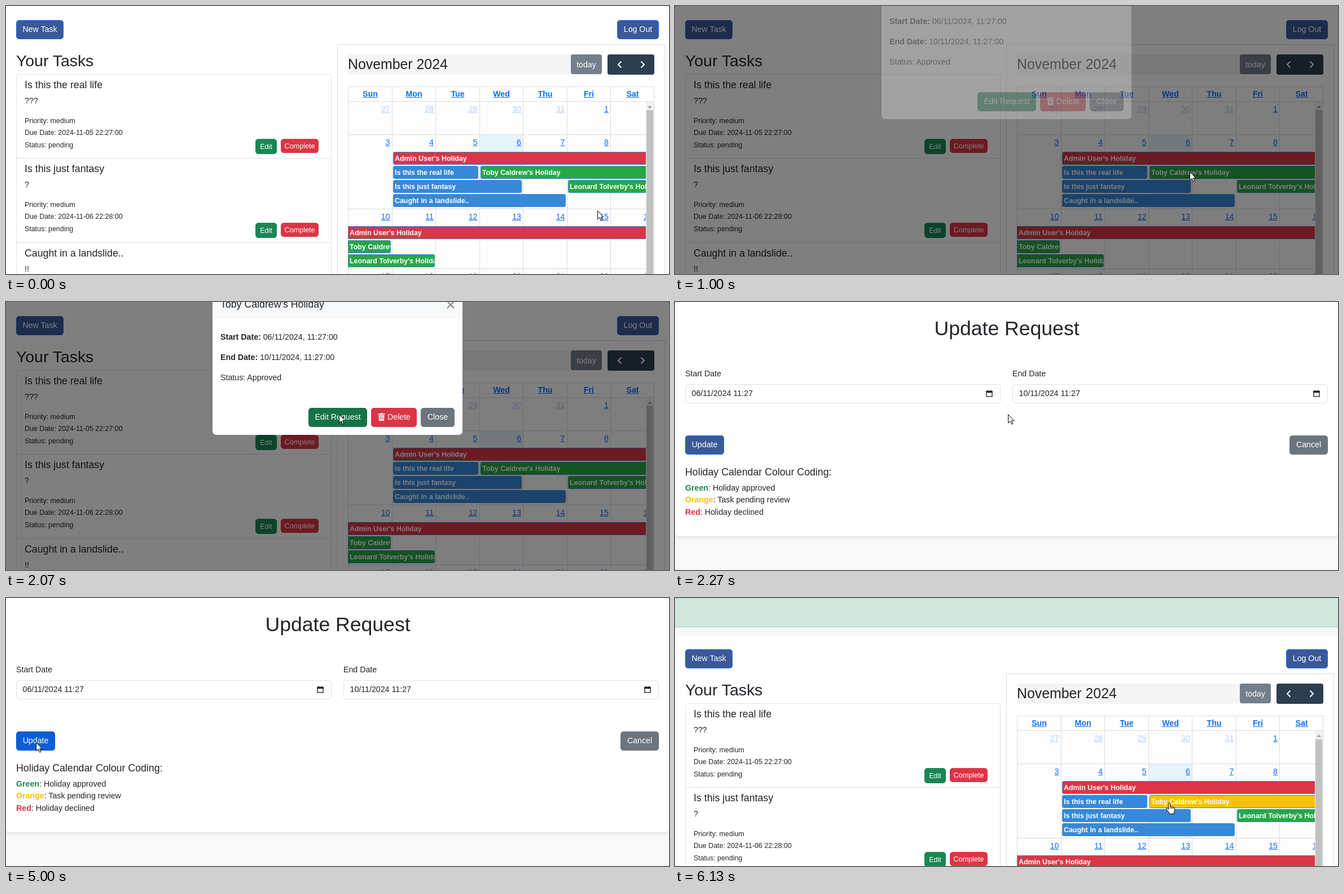
Recreate the animation shown at these times as an HTML page. Size 1175 by 476 pixels, loop 8870 ms.

```html
<!DOCTYPE html>
<html lang="en">
<head>
<meta charset="utf-8">
<title>Task planner</title>
<style>
  html, body { margin: 0; width: 100%; height: 100%; overflow: hidden; background: #f9f9f9; }
  #stage { position: relative; width: 1175px; height: 476px; overflow: hidden; background: #f9f9f9;
    font-family: "Liberation Sans", Arial, sans-serif; color: #212529; }
  #stage div, #stage svg { position: absolute; box-sizing: border-box; }
  #stage .text, #stage svg { pointer-events: none; }
  .text { white-space: pre; }
  .layer { left: 0; top: 0; width: 1175px; height: 476px; }
  .card { background: #fff; border-radius: 7px; box-shadow: 0 3px 7px rgba(0, 0, 0, .1); }
  .link { color: #0d6efd; text-decoration: underline; text-decoration-skip-ink: none; }
  .button { border: 1px solid; border-radius: 5px; }
  .event { border: 1px solid #3788d8; overflow: hidden; color: #fff; font-weight: bold; }
</style>
</head>
<body>
<div id="stage"></div>
<script>
const LOOP = 8870, STEP = 1000 / 15, W = 1175;
const BODY = 14.2, SMALL = 12.42, HEAD = 17.75;
const WHITE = 'color:#fff;', LINE = '#ddd';
const BLUE = '#3788d8', GREEN = '#28a745', RED = '#dc3545', YELLOW = '#ffc107';
const stage = document.getElementById('stage');

function box(parent, x, y, w, h, css = '', cls = '') {
  const el = document.createElement('div');
  el.className = cls;
  el.style.cssText = `left:${x}px;top:${y}px;width:${w}px;height:${h}px;${css}`;
  parent.append(el);
  return el;
}

function layer(parent) {
  return box(parent, 0, 0, W, 476);
}

// Places text by its baseline; x is the left, centre or right edge.
function text(parent, x, base, str, size = BODY, css = '', align = 'left', cls = '') {
  const up = Math.round(size * .905), line = up + Math.round(size * .212);
  const el = document.createElement('div');
  const place = {
    left: `left:${x}px;`,
    center: `left:${x - 200}px;width:400px;text-align:center;`,
    right: `right:${W - x}px;`
  }[align];
  el.className = 'text ' + cls;
  el.style.cssText = `${place}top:${base - up}px;font-size:${size}px;line-height:${line}px;${css}`;
  el.innerHTML = str;
  parent.append(el);
  return el;
}

function button(parent, x, y, w, h, label, color, base, size = BODY, border = color) {
  const el = box(parent, x, y, w, h, `background:${color};border-color:${border}`, 'button');
  text(parent, x + w / 2, base, label, size, WHITE, 'center');
  return el;
}

function svg(parent, x, y, w, h, body) {
  parent.insertAdjacentHTML('beforeend',
    `<svg style="left:${x}px;top:${y}px" width="${w}" height="${h}" viewBox="0 0 ${w} ${h}">${body}</svg>`);
  return parent.lastElementChild;
}

function primary(parent, x, y, w, label) {
  return button(parent, x, y, w, 34, label, '#3b5998', y + 21, BODY, '#0d6efd');
}

// Home page
const home = layer(stage);
box(home, 0, 0, W, 700, '', 'card');
primary(home, 18, 25, 84, 'New Task');
primary(home, 1083, 25, 74, 'Log Out');
text(home, 18, 107, 'Your Tasks', 28.4);
box(home, 18, 121, 559, 500, 'border:1px solid #dee2e6;border-radius:5px');

const tasks = [
  ['Is this the real life', '???', '05 22:27:00'],
  ['Is this just fantasy', '?', '06 22:28:00'],
  ['Caught in a landslide..', '!!', '07 22:28:00']
];
tasks.forEach(([title, note, due], i) => {
  const y = Math.round(i * 149.4);
  if (i) box(home, 18, 121 + y, 558, 1, 'background:#dee2e6');
  text(home, 33, 146 + y, title, HEAD);
  text(home, 33, 173 + y, note);
  text(home, 33, 208 + y, 'Priority: medium', SMALL);
  text(home, 33, 229 + y, 'Due Date: 2024-11-' + due, SMALL);
  text(home, 33, 251 + y, 'Status: pending', SMALL);
  button(home, 442, 236 + y, 38, 27, 'Edit', '#198754', 254 + y, 12.6);
  button(home, 487, 236 + y, 67, 25, 'Complete', RED, 253 + y, 12.6);
});

// Calendar
const cal = layer(home);
const colX = i => 606.5 + i * 77.5;
box(cal, 587, 68, 581, 600, `border:1px solid ${LINE}`);
box(cal, 606, 86, 449, 36, 'background:#f4f4f4');
text(cal, 606, 112, 'November 2024', 24.85);
box(cal, 1001, 86, 55, 35, 'background:#737f8a;border-radius:4px');
text(cal, 1028.5, 109, 'today', BODY, WHITE, 'center');
box(cal, 1066, 86, 83, 36, 'background:#2c3e50;border-radius:4px');
svg(cal, 1066, 86, 83, 36,
  '<path d="M24.5 12.5 19 18l5.5 5.5M59.5 12.5 65 18l-5.5 5.5" fill="none" stroke="#fff" stroke-width="2"/>');
box(cal, 606, 143, 543, 400, `background:#fdfdfd;border:1px solid ${LINE}`);
box(cal, 607, 144, 541, 25, 'background:#fff');
box(cal, 839, 229, 77, 131, 'background:#e6f4fc');
[169, 228, 360, 466].forEach(y => box(cal, 606, y, 543, 1, `background:${LINE}`));
for (let i = 1; i < 7; i++) box(cal, Math.floor(colX(i)), 143, 1, 400, `background:${LINE}`);
['Sun', 'Mon', 'Tue', 'Wed', 'Thu', 'Fri', 'Sat'].forEach((d, i) =>
  text(cal, colX(i) + 39, 161, d, BODY, 'font-weight:bold', 'center', 'link'));

const month = layer(cal);
month.style.clipPath = 'inset(0 41px -200px 0)';
[188, 247, 379, 485].forEach((base, row) => {
  for (let i = 0; i < 7; i++) {
    const n = row * 7 + i - 4;
    text(month, colX(i + 1) - 3.5, base, n > 0 ? n : n + 31, BODY, n > 0 ? '' : 'opacity:.3', 'right', 'link');
  }
});

function event(x, y, right, label, color, round = '3px') {
  const el = box(month, x, y, right - x, 23, `background:${color};border-radius:${round}`, 'event');
  text(el, 2, 15, label, SMALL);
  return el;
}
const admin = "Admin User's Holiday", first = "Toby Caldrew's Holiday", second = "Leonard Tolverby's Holiday";
event(686, 259, 1160, admin, RED);
event(686, 284, 837, tasks[0][0], BLUE);
event(686, 309, 914, tasks[1][0], BLUE);
event(686, 334, 992, tasks[2][0], BLUE);
event(996, 309, 1160, second, GREEN);
event(606, 391, 1160, admin, RED, '0');
event(606, 441, 760, second, GREEN, '0 3px 3px 0');
const requests = [
  event(841, 284, 1160, first, GREEN),
  event(606, 416, 682, first, GREEN, '0 3px 3px 0')
];

box(cal, 1134, 170, 14, 400, 'background:#f1f1f1');
box(cal, 1135, 185, 12, 400, 'background:#c1c1c1');
svg(cal, 1136, 175, 10, 7, '<path d="M1 6 5 1.5 9 6z" fill="#a3a3a3"/>');

const alertBar = box(stage, 0, 0, W, 52, 'background:#d1e7dd;border:solid #a3cfbb;border-width:1px 0');

// Request dialog
const shade = layer(stage);
shade.style.background = '#000';
const modal = layer(stage);
box(modal, 366, -40, 443, 276, 'background:#fff;border-radius:7px;overflow:hidden');
box(modal, 366, -40, 443, 70, 'background:#f8f9fa;border-radius:7px 7px 0 0');
text(modal, 380, 10, first, HEAD);
svg(modal, 781, -2, 14, 14, '<path d="M1 1 13 13M13 1 1 13" stroke="#7b7c7d" stroke-width="1.8"/>');
text(modal, 380, 67, '<b>Start Date:</b> 06/11/2024, 11:27:00');
text(modal, 380, 103, '<b>End Date:</b> 10/11/2024, 11:27:00');
text(modal, 380, 139, 'Status: Approved');
const editBtn = button(modal, 536, 188, 104, 34, 'Edit Request', '#198754', 209);
button(modal, 647, 188, 81, 34, '', RED, 209);
svg(modal, 659, 197, 13, 14,
  '<path d="M.5 1.2h3.7L5 .3h3l.8.9h3.7V3H.5zM1.4 4h10.2L11 13q0 1-1 1H3q-1 0-1-1z" fill="#fff"/>' +
  '<path d="M4.2 5.5v6.5M6.5 5.5v6.5M8.8 5.5v6.5" stroke="#dc3545" stroke-width=".9"/>');
text(modal, 676, 209, 'Delete', BODY, WHITE);
button(modal, 735, 188, 60, 34, 'Close', '#6c757d', 209);

// Update form
const form = layer(stage);
form.style.background = '#f9f9f9';
box(form, 0, 0, W, 416, '', 'card');
text(form, 588, 59, 'Update Request', 35.6, '', 'center');
[[18, 'Start', '06'], [598, 'End', '10']].forEach(([x, name, day]) => {
  text(form, x, 132, name + ' Date');
  box(form, x, 146, 559, 34, 'border:1px solid #dee2e6;border-radius:5px');
  text(form, x + 11.5, 167, day + '/11/2024 11:27');
  svg(form, x + 533, 156, 12, 13,
    '<path d="M1 2.5h10v9.3H1z" fill="none" stroke="#111" stroke-width="1.3"/>' +
    '<path d="M.5 2h11v3H.5zM2.4.5h1.4V2H2.4zM8.2.5h1.4V2H8.2z" fill="#111"/>');
});
const updateBtn = primary(form, 18, 237, 69, 'Update');
button(form, 1089, 237, 68, 34, 'Cancel', '#6c757d', 258);
text(form, 18, 308, 'Holiday Calendar Colour Coding:', HEAD);
[['Green', '#198754', 'Holiday approved'], ['Orange', YELLOW, 'Task pending review'], ['Red', RED, 'Holiday declined']]
  .forEach(([name, color, meaning], i) =>
    text(form, 18, Math.round(335 + i * 21.4), `<b style="color:${color}">${name}</b>: ${meaning}`));

// Pointers
const arrow = svg(stage, 0, 0, 13, 20,
  '<path d="M.6.8v15l3.6-3.2 2.4 5.5 2.3-1-2.4-5.3h4.6z" fill="#fff" stroke="#000"/>');
const hand = svg(stage, 0, 0, 17, 22,
  '<path d="M4.7 12.5V2.2a1.5 1.5 0 0 1 3 0v5.2q2-.8 2.6.8 2-.8 2.5.8 2.2-.6 2.5 1.2v4c0 2.8-1.4 3.2-1.5 6.3H6.2' +
  'c0-3-2.6-4.4-5.2-8.6-.8-1.7 1-2.7 2.3-1.2z" fill="#fff" stroke="#000"/>' +
  '<path d="M7.7 7v4M10.3 8v3.2M12.8 9v2.4" stroke="#000" fill="none"/>');

// time, x, y
const path = [
  [0, 1048, 363], [70, 1044, 345], [130, 1022, 298], [200, 982, 248], [270, 945, 246], [330, 920, 275], [400, 912, 294],
  [1270, 912, 294], [1400, 815, 264], [1530, 670, 221], [1670, 597, 202], [1870, 590, 199],
  [3610, 590, 199], [3870, 490, 212], [4270, 160, 246], [4530, 53, 256],
  [5010, 53, 256], [5200, 150, 264], [5670, 550, 296], [5870, 687, 305], [6000, 815, 345], [6130, 876, 363],
  [LOOP, 876, 363]
];

// Each click first shows the plain arrow, then the next page.
const LOAD = 130, EDIT_CLICK = 2070, UPDATE_CLICK = 5000;
const SHADE_IN = 800, MODAL_IN = 960;

const ramp = (t, a, b) => Math.min(1, Math.max(0, (t - a) / (b - a)));
const within = (t, a, b) => t >= a && t < b;
const show = (el, on) => { el.style.display = on ? 'block' : 'none'; };
const mix = (a, b, k) => `rgb(${a.map((v, i) => Math.round(v + (b[i] - v) * k))})`;

function pointerAt(t) {
  const i = Math.max(1, path.findIndex(p => p[0] > t));
  const [t0, x0, y0] = path[i - 1], [t1, x1, y1] = path[i];
  const k = ramp(t, t0, t1);
  return [Math.round(x0 + (x1 - x0) * k), Math.round(y0 + (y1 - y0) * k)];
}

function overTarget(x, y) {
  const el = document.elementFromPoint(x, y);
  return Boolean(el && el.closest('.button, .event'));
}

function draw(now) {
  const t = Math.round(Math.floor((now % LOOP + 4) / STEP) * STEP / 10) * 10;
  const editing = within(t, EDIT_CLICK + LOAD, UPDATE_CLICK + LOAD);
  const saved = t >= UPDATE_CLICK + LOAD;

  show(home, !editing);
  show(form, editing);
  show(alertBar, saved);
  home.style.top = saved ? '66px' : '0';
  requests.forEach(el => { el.style.backgroundColor = saved ? YELLOW : GREEN; });

  const open = within(t, SHADE_IN, EDIT_CLICK + LOAD);
  show(shade, open);
  show(modal, open && t > MODAL_IN);
  shade.style.opacity = ramp(t, SHADE_IN, SHADE_IN + 150) / 2;
  modal.style.opacity = ramp(t, MODAL_IN, MODAL_IN + 150);
  modal.style.top = Math.round(-50 * Math.pow(1 - ramp(t, MODAL_IN, MODAL_IN + 300), 2.5)) + 'px';

  editBtn.style.background = editBtn.style.borderColor =
    mix([25, 135, 84], [21, 115, 71], ramp(t, 1690, 1900));
  const hover = ramp(t, 4440, 4600);
  updateBtn.style.background = mix([59, 89, 152], [11, 94, 215], hover);
  updateBtn.style.borderColor = mix([13, 110, 253], [10, 88, 202], hover);

  const [x, y] = pointerAt(t);
  const loading = [EDIT_CLICK, UPDATE_CLICK].some(c => within(t, c, c + LOAD));
  const pointing = !loading && overTarget(x, y);
  show(arrow, !pointing);
  show(hand, pointing);
  arrow.style.transform = `translate(${x}px,${y}px)`;
  hand.style.transform = `translate(${x - 6}px,${y}px)`;
}

const start = performance.now();
function tick() {
  draw(performance.now() - start);
  requestAnimationFrame(tick);
}
tick();
</script>
</body>
</html>
```
